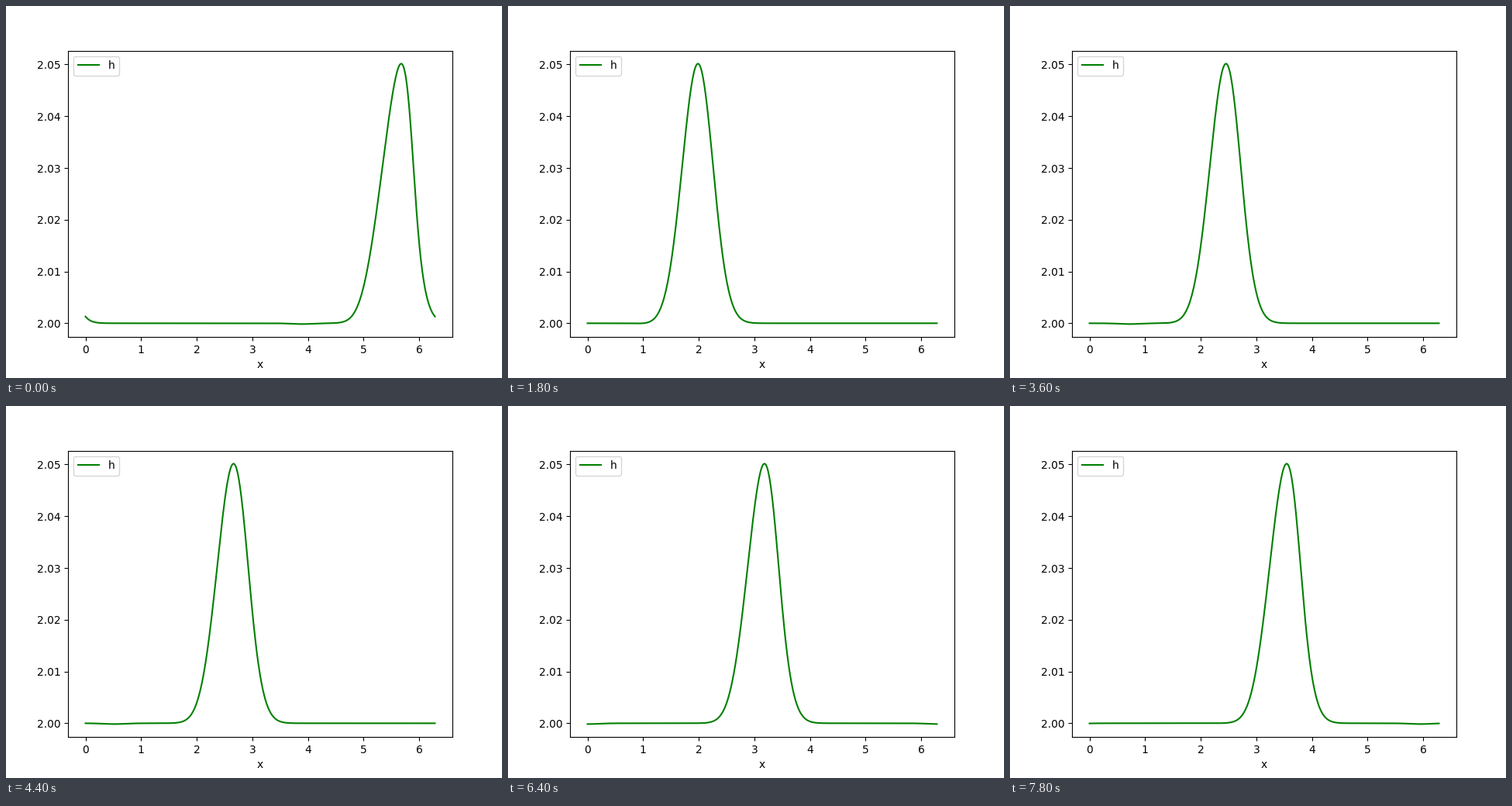
A matplotlib script for the animation above (8 s loop, 640 by 480 pixels).

```python
import numpy as np
import matplotlib.pyplot as plt
from matplotlib.animation import FuncAnimation

FRAMES, INTERVAL = 40, 200
CYCLE = 80             # states in the full run
L = 2 * np.pi
DEPTH, AMP = 2.0, 0.05
WAVE_STEP = 0.0501     # linear wave travel per state

x = np.linspace(0, L, 500)
start = np.linspace(0, L, 2000, endpoint=False)
bump = AMP * np.exp(-((start - L / 4) / (L / 16)) ** 2)

# The linear starting velocity leaves a faint trough running the other way.
trough = -bump ** 2 / (8 * DEPTH)
crest = bump - trough


def travel(eta, distance):
    """Shallow-water simple wave: higher points move faster."""
    speed = 3 * np.sqrt(1 + eta / DEPTH) - 2
    return np.interp(x, start + speed * distance, eta, period=L)


def surface(step):
    d = WAVE_STEP * step
    return DEPTH + travel(crest, d) + travel(trough, -d)


fig, ax = plt.subplots(figsize=(6.4, 4.8), dpi=100)
line, = ax.plot(x, surface(CYCLE - 1), color="green", label="h")
low, high = DEPTH + trough.min(), DEPTH + crest.max()
pad = 0.05 * (high - low)
ax.set_xlim(-0.05 * L, 1.05 * L)
ax.set_ylim(low - pad, high + pad)
ax.set_xlabel("x")
ax.legend(loc="upper left")


def update(i):
    line.set_ydata(surface((i - 1) % CYCLE))
    return line,


anim = FuncAnimation(fig, update, frames=FRAMES, interval=INTERVAL,
                     repeat=True, repeat_delay=0)
plt.show()
```
